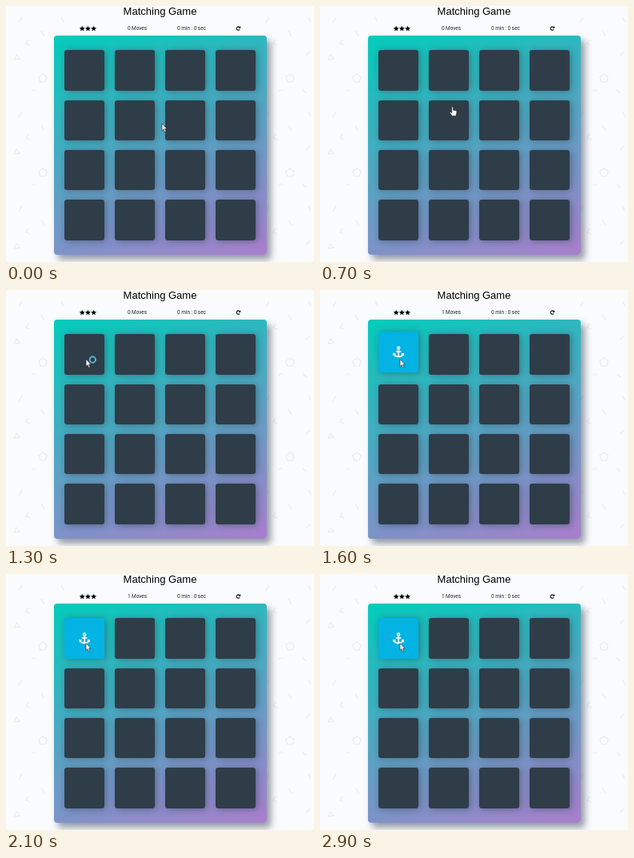
An HTML page that plays this animation: 385x320 px, repeating every 3000 ms.

```html
<!DOCTYPE html>
<html lang="en">
<head>
<meta charset="utf-8">
<title>Matching Game</title>
<style>
  html, body { margin: 0; width: 100%; height: 100%; overflow: hidden; background: #fafbfd; }
  .stage { position: relative; width: 385px; height: 320px; overflow: hidden; }
  .layer { position: absolute; left: 0; top: 0; width: 385px; height: 320px; }
  .title { font: 13px "Liberation Sans", Arial, sans-serif; text-anchor: middle; }
  .stat { font: 6.4px Roboto, sans-serif; text-anchor: middle; fill: #222; }

  .deck {
    position: absolute; left: 60px; top: 37px; width: 266px; height: 274px;
    border-radius: 4px;
    background: linear-gradient(160deg, #02ccba 0%, #aa7ecd 100%);
    box-shadow: 5px 6px 8px rgba(46, 61, 73, .5);
  }
  .grid {
    position: absolute; left: 13px; top: 18.4px;
    display: grid; grid-template: repeat(4, 50.3px) / repeat(4, 50.3px);
    gap: 12px 12.7px;
  }
  .card {
    border-radius: 3.2px; background: #2f3d49;
    box-shadow: 2px 1px 8px rgba(46, 61, 73, .5);
  }
  .pick { animation: flip 3s step-end infinite, bounce 3s step-end infinite; }
  .pick svg { display: block; width: 50.3px; height: 50.3px; }
  .after { animation: after 3s step-end infinite; }
  .before { animation: before 3s step-end infinite; }

  .cursor { animation: travel 3s infinite; }
  .arrow { animation: arrow 3s step-end infinite; }
  .hand { animation: hand 3s step-end infinite; }
  .busy { animation: busy 3s step-end infinite; }

  @keyframes flip {
    0% { background: #2f3d49; }
    46.66%, 100% { background: #02b3e4; }
  }
  @keyframes bounce {
    0% { transform: none; }
    53.33% { transform: translateY(-3px); }
    56.66% { transform: translateY(-10px); }
    60% { transform: translateY(-12px); }
    63.33% { transform: translateY(-5.5px); }
    66.66%, 100% { transform: none; }
  }
  @keyframes after { 0% { opacity: 0; } 46.66%, 100% { opacity: 1; } }
  @keyframes before { 0% { opacity: 1; } 46.66%, 100% { opacity: 0; } }
  @keyframes travel {
    0% { transform: translate(195px, 147px); animation-timing-function: step-end; }
    10% { transform: translate(195px, 147px); animation-timing-function: steps(4); }
    23.33% { transform: translate(166px, 126px); animation-timing-function: steps(5); }
    40%, 100% { transform: translate(100px, 86.5px); }
  }
  @keyframes arrow {
    0%, 30%, 43.33%, 100% { opacity: 1; }
    16.66%, 36.66% { opacity: 0; }
  }
  @keyframes hand {
    0%, 30%, 43.33%, 100% { opacity: 0; }
    16.66%, 36.66% { opacity: 1; }
  }
  @keyframes busy {
    0%, 46.66%, 100% { opacity: 0; }
    43.33% { opacity: 1; }
  }
</style>
</head>
<body>
<div class="stage">
  <svg class="layer" viewBox="0 0 385 320">
    <defs>
      <pattern id="confetti" width="309" height="118" patternUnits="userSpaceOnUse">
        <g fill="none" stroke="#e9ebef" stroke-width="1.2">
          <path d="M46 85l5.2 3.8-2 6.2h-6.4l-2-6.2z"/>
          <path d="M10 67l3-6 4 5z"/>
          <path d="M16 21l4-7M44 31l4 7M28 42l-3 5 5 2M66 62l5-5M69 14l3 6"/>
          <path d="M32 107q3-5 5 0M62 105l5 4"/>
        </g>
      </pattern>
      <path id="star" d="M0-3.4L1-1.1 3.4-.9 1.6.8 2.1 3.1 0 1.9-2.1 3.1-1.6.8-3.4-.9-1-1.1z"/>
    </defs>
    <rect width="385" height="320" fill="url(#confetti)"/>
    <text class="title" x="192.5" y="11">Matching Game</text>
    <use href="#star" x="95.2" y="28.1"/>
    <use href="#star" x="102.4" y="28.1"/>
    <use href="#star" x="109.6" y="28.1"/>
    <text class="stat before" x="164" y="30.4">0 Moves</text>
    <text class="stat after" x="164" y="30.4">1 Moves</text>
    <text class="stat" x="232" y="30.4">0 min : 0 sec</text>
    <path d="M292.2 29.4a2.2 2.2 0 1 1-.3-3" fill="none" stroke="#111" stroke-width="1.1"/>
    <path d="M293.2 25v2.9h-2.9z" fill="#111"/>
  </svg>

  <div class="deck">
    <div class="grid">
      <div class="card pick">
        <svg class="after" viewBox="-25.15 -25.5 50.3 50.3">
          <g fill="none" stroke="#fff" stroke-width="1.8">
            <circle cy="-4.9" r="1.5" stroke-width="1.5"/>
            <path d="M0-3.2V5.7M-3.2-.7h6.4"/>
            <path d="M-5.5 2.8C-4.6 5-2.4 5.8 0 5.8S4.6 5 5.5 2.8"/>
          </g>
          <path d="M-7 1.2l3.9.5-3.4 3.3zM7 1.2l-3.9.5 3.4 3.3z" fill="#fff"/>
        </svg>
      </div>
      <div class="card"></div><div class="card"></div><div class="card"></div>
      <div class="card"></div><div class="card"></div><div class="card"></div><div class="card"></div>
      <div class="card"></div><div class="card"></div><div class="card"></div><div class="card"></div>
      <div class="card"></div><div class="card"></div><div class="card"></div><div class="card"></div>
    </div>
  </div>

  <svg class="layer" viewBox="0 0 385 320">
    <g class="cursor" fill="#fff" stroke="#222" stroke-width=".6" stroke-linejoin="round">
      <path class="arrow" d="M0 0v9l2-1.9 1.5 3.5 1.5-.7-1.5-3.3h2.7z"/>
      <path class="hand" d="M-1.2.5q.9-1 1.8 0v3.7l3.2.6q1.2.3 1.1 1.6l-.5 3-.8 2.2h-4.4l-3-4.4q.4-1.4 1.7-.4l.9.9z"/>
      <circle class="busy" cx="8.3" cy=".6" r="3.7" fill="none" stroke="#62c3dc" stroke-width="1.7"/>
    </g>
  </svg>
</div>
</body>
</html>
```
